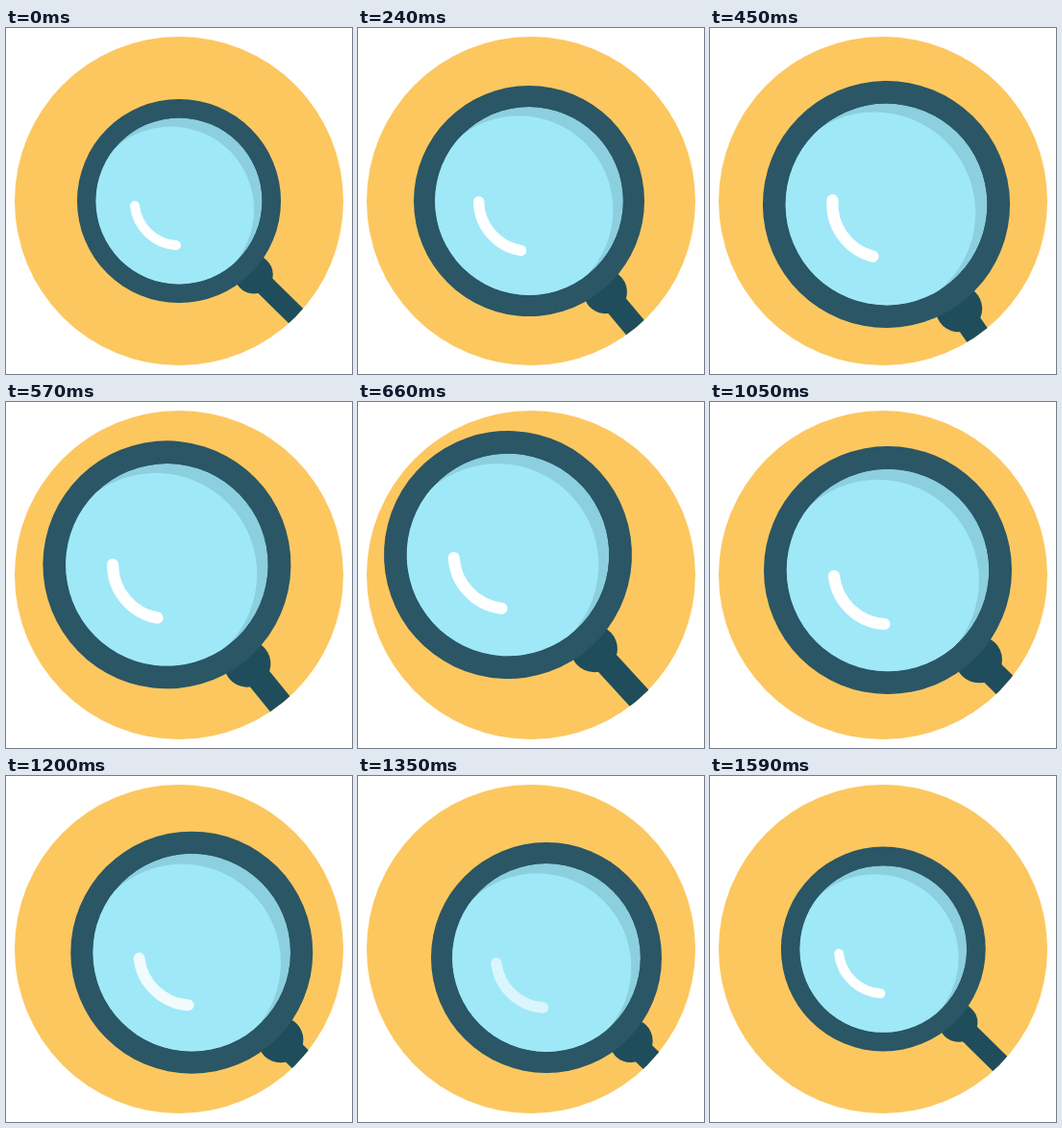
These frames come from a looping animation (360 by 360 pixels, 1.62 s). An HTML page:

```html
<!DOCTYPE html>
<html lang="en">
<head>
<meta charset="utf-8">
<title>Magnifying glass</title>
<style>
  html, body { margin: 0; width: 100%; height: 100%; overflow: hidden; background: #fff; }
  svg { display: block; width: 100vw; height: 100vh; }
</style>
</head>
<body>
<svg viewBox="0 0 360 360">
  <defs>
    <clipPath id="badge"><circle cx="180" cy="180" r="171"/></clipPath>
    <clipPath id="lens"><circle r="86.5"/></clipPath>
  </defs>
  <circle cx="180" cy="180" r="171" fill="#fcc75f"/>
  <g clip-path="url(#badge)">
    <g id="glass" transform="translate(180 180)">
      <g transform="rotate(44.5)" fill="#1f4d5b">
        <rect x="100" y="-10.7" width="160" height="21.4"/>
        <circle cx="109" r="20"/>
      </g>
      <circle r="106" fill="#2a5665"/>
      <g clip-path="url(#lens)">
        <circle r="86.5" fill="#8ccfde"/>
        <circle cx="-8.5" cy="9" r="86.5" fill="#9fe8f7"/>
      </g>
      <path id="glint" d="M-46 5A46.3 46.3 0 0 0 -3 46" fill="none"
            stroke="#fff" stroke-width="10" stroke-linecap="round"/>
    </g>
  </g>
</svg>
<script>
const LOOP = 1620, STEP = 30;
const glass = document.getElementById('glass');
const glint = document.getElementById('glint');

// Periodic cubic track; "flat" keeps extremes on the keys.
function track(times, values, flat) {
  const n = times.length;
  const span = i => (i < n - 1 ? times[i + 1] : LOOP) - times[i];
  const slope = i => (values[(i + 1) % n] - values[i]) / span(i);
  const tangents = values.map((_, i) => {
    const p = (i + n - 1) % n, a = slope(p), b = slope(i);
    if (flat) return a * b > 0 ? 2 * a * b / (a + b) : 0;
    return (a * span(i) + b * span(p)) / (span(p) + span(i));
  });
  return t => {
    let i = n - 1;
    while (times[i] > t) i--;
    const j = (i + 1) % n, h = span(i), u = (t - times[i]) / h, w = 1 - u;
    return values[i] * w * w * (1 + 2 * u) + values[j] * u * u * (3 - 2 * u)
      + h * u * w * (tangents[i] * w - tangents[j] * u);
  };
}

const path = [0, 240, 450, 660, 1050, 1350, 1590];
const x = track(path, [180, 178, 183.5, 156, 185, 196, 180.3]);
const y = track(path, [180, 180, 183.5, 159, 175, 189, 180]);
const turn = track(path, [0, 5.5, 10.7, 3, 0, 0, 0], true);
const size = track([0, 240, 450, 540, 1050, 1350, 1590],
  [1, 1.132, 1.213, 1.217, 1.217, 1.132, 1.004], true);
const shine = track([0, 1080, 1350, 1560], [1, 1, 0.62, 1], true);

function draw(now) {
  const t = Math.floor(now % LOOP / STEP) * STEP;
  glass.setAttribute('transform',
    `translate(${x(t)} ${y(t)}) rotate(${turn(t)}) scale(${size(t)})`);
  glint.setAttribute('opacity', shine(t));
}

let start;
function tick(now) {
  start ??= now;
  draw(now - start);
  requestAnimationFrame(tick);
}
draw(0);
requestAnimationFrame(tick);
</script>
</body>
</html>
```
